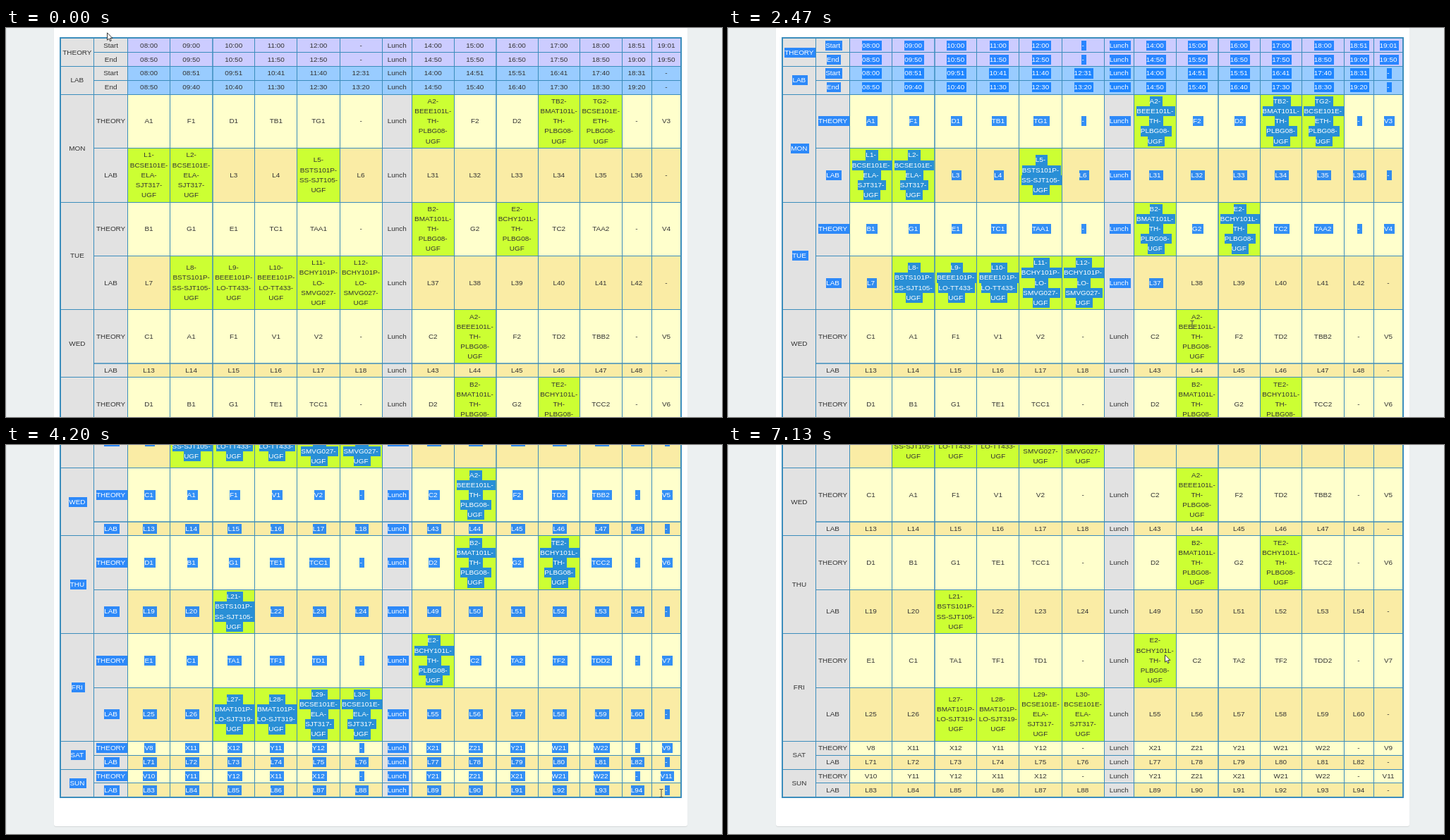
An HTML page for the animation above (7790 ms loop, 1015 px wide and 552 px high).

```html
<!DOCTYPE html>
<html lang="en">
<head>
<meta charset="utf-8">
<title>Timetable selection</title>
<style>
html, body { margin: 0; width: 100%; height: 100%; overflow: hidden; }
#stage { position: relative; width: 1015px; height: 552px; overflow: hidden; background: #ecf0f1; }
#stage div, #stage svg { position: absolute; box-sizing: border-box; }
#edge { left: 0; top: 0; width: 1px; height: 552px; background: #dfe3e5; }
#page { left: 0; top: 0; width: 1015px; height: 960px; }
#card { left: 68px; top: -60px; width: 898px; height: 968px; background: #fff; box-shadow: 0 1px 1px rgba(0,0,0,.1); border-radius: 3px; }
.frame { border: 2px solid #3c8dbc; }
.cell { display: flex; flex-direction: column; align-items: center; justify-content: center;
  font: 9.95px/14.15px "Liberation Sans", Arial, sans-serif; color: #333; white-space: nowrap; }
.cell span { padding-right: 3px; margin-right: -3px; }
.cell.on span { background: rgba(0,116,255,.8); color: #fff; }
.line { background: #3c8dbc; }
.heavy { opacity: .75; }
#bar { left: 0; top: 0; width: 38px; height: 3px; background: #3390ff; }
#menu { left: 606px; top: 292px; width: 378px; height: 115px; background: #292a2d; box-shadow: 1px 1px 2px rgba(0,0,0,.55);
  font: 9.5px/20px "Open Sans", "Noto Sans", sans-serif; color: #e8eaed; white-space: nowrap; }
#menu div { left: 0; width: 378px; height: 20px; padding: 0 21px; }
#menu i { position: absolute; right: 21px; font-style: normal; color: #9aa0a6; }
#menu .dim { color: #808387; }
#menu .rule { top: 87px; height: 1px; background: #3f4145; }
#menu .hot { background: #3f4145; }
#arrow, #beam { left: 0; top: 0; overflow: visible; }
</style>
</head>
<body>
<div id="stage">
  <div id="page"><div id="card"></div></div>
  <div id="edge"></div>
  <div id="bar"></div>
  <div id="menu">
    <div id="copy" style="top:4px">Copy<i>Ctrl+C</i></div>
    <div class="dim" style="top:24px">Copy link to highlight</div>
    <div style="top:43px">Search Ondary for “THEORY Start 08:00 09:00 10:00 11:00 12:00 -...”</div>
    <div style="top:63px">Print...<i>Ctrl+P</i></div>
    <div class="rule"></div>
    <div style="top:92px">Inspect</div>
  </div>
  <svg id="arrow" width="10" height="15"><path d="M.5 .8V11.2L2.9 9 4.5 12.7 6.2 12 4.6 8.4H7.9Z" fill="#fff" stroke="#222" stroke-width=".9"/></svg>
  <svg id="beam" width="8" height="12"><path d="M-2.5-5.5H-.7L0-5 .7-5.5H2.5M0-5V5M-2.5 5.5H-.7L0 5 .7 5.5H2.5" fill="none" stroke="#444"/></svg>
</div>
<script>
const $ = id => document.getElementById(id);
const page = $('page');
const GREY = '#e2e2e2', GREEN = '#ccff33';
const LEFT = 77, TOP = 15, LINE = 14.15, PAD = 5.65;

// Course text ("/" breaks the line) and the slots it fills.
const COURSES = {
  'BEEE101L-/TH-/PLBG08-/UGF': 'A2',
  'BMAT101L-/TH-/PLBG08-/UGF': 'B2 TB2',
  'BCHY101L-/TH-/PLBG08-/UGF': 'E2 TE2',
  'BCSE101E-/ETH-/PLBG08-/UGF': 'TG2',
  'BCSE101E-/ELA-/SJT317-/UGF': 'L1 L2 L29 L30',
  'BSTS101P-/SS-SJT105-/UGF': 'L5 L8 L21',
  'BEEE101P-/LO-TT433-/UGF': 'L9 L10',
  'BCHY101P-/LO-/SMVG027-/UGF': 'L11 L12',
  'BMAT101P-/LO-SJT319-/UGF': 'L27 L28'
};
const booked = {};
for (const [text, slots] of Object.entries(COURSES)) {
  for (const slot of slots.split(' ')) booked[slot] = `${slot}-/${text}`;
}

const DAYS = {
  MON: 'A1 F1 D1 TB1 TG1 - Lunch A2 F2 D2 TB2 TG2 - V3',
  TUE: 'B1 G1 E1 TC1 TAA1 - Lunch B2 G2 E2 TC2 TAA2 - V4',
  WED: 'C1 A1 F1 V1 V2 - Lunch C2 A2 F2 TD2 TBB2 - V5',
  THU: 'D1 B1 G1 TE1 TCC1 - Lunch D2 B2 G2 TE2 TCC2 - V6',
  FRI: 'E1 C1 TA1 TF1 TD1 - Lunch E2 C2 TA2 TF2 TDD2 - V7',
  SAT: 'V8 X11 X12 Y11 Y12 - Lunch X21 Z21 Y21 W21 W22 - V9',
  SUN: 'V10 Y11 Y12 X11 X12 - Lunch Y21 Z21 X21 W21 W22 - V11'
};

const run = (n, first, f) => Array.from({ length: n }, (_, i) => f(first + i));
const hours = (min, late) => {
  const at = h => String(h).padStart(2, '0') + min;
  return [...run(5, 8, at), '-', 'Lunch', ...run(5, 14, at), ...late.split(' ')];
};
const labs = day => {
  const am = day < 5 ? 6 * day + 1 : 12 * day + 11;
  const pm = am + (day < 5 ? 30 : 6);
  const slot = n => 'L' + n;
  return [...run(6, am, slot), 'Lunch', ...run(6, pm, slot), '-'];
};
const rows = [
  hours(':00', '18:51 19:01'),
  hours(':50', '19:00 19:50'),
  '08:00 08:51 09:51 10:41 11:40 12:31 Lunch 14:00 14:51 15:51 16:41 17:40 18:31 -'.split(' '),
  '08:50 09:40 10:40 11:30 12:30 13:20 Lunch 14:50 15:40 16:40 17:30 18:30 19:20 -'.split(' '),
  ...Object.values(DAYS).flatMap((theory, day) => [theory.split(' '), labs(day)])
];
const groups = ['THEORY', 'LAB', ...Object.keys(DAYS)];

// Columns come in blocks of equal width; a row is as tall as its longest cell.
const xs = [LEFT], ys = [TOP];
for (const [n, w] of [[2, 47.75], [6, 60.1], [1, 42.4], [5, 59.5], [2, 42]]) {
  for (let i = 0; i < n; i++) xs.push(xs.at(-1) + w);
}
for (const row of rows) {
  const lines = Math.max(...row.map(s => (booked[s] || s).split('/').length));
  ys.push(ys.at(-1) + PAD + LINE * lines);
}
const right = xs.at(-1), bottom = ys.at(-1);

function box(cls, x, y, w, h) {
  const el = document.createElement('div');
  el.className = cls;
  Object.assign(el.style, { left: x + 'px', top: y + 'px', width: w + 'px', height: h + 'px' });
  return page.appendChild(el);
}

const cells = [];
function addCell(text, col, row, fill, span = 1) {
  const x0 = xs[col], x1 = xs[col + 1], y0 = ys[row], y1 = ys[row + span];
  const el = box('cell', x0, y0, x1 - x0, y1 - y0);
  el.style.background = fill;
  for (const part of text.split('/')) {
    el.appendChild(document.createElement('span')).textContent = part;
  }
  cells.push({ x0, x1, y0, y1, el });
}

rows.forEach((row, r) => {
  const odd = r % 2, head = r < 4;
  if (!odd) addCell(groups[r / 2], 0, r, GREY, 2);
  addCell((head ? ['Start', 'End'] : ['THEORY', 'LAB'])[odd], 1, r, GREY);
  const fill = r < 2 ? '#ccccff' : head ? '#99ccff' : odd ? '#faeca5' : '#ffffcc';
  row.forEach((slot, c) => {
    const grey = slot === 'Lunch' && !head;
    addCell(booked[slot] || slot, c + 2, r, booked[slot] ? GREEN : grey ? GREY : fill);
  });
});

// Start pixel and thickness of a grid line
const rule = (p, heavy) => heavy ? [Math.round(p - 1), 2, 'line heavy'] : [Math.floor(p), 1, 'line'];
xs.slice(1, -1).forEach((p, i) => {
  const [x, w, cls] = rule(p, i === 3 || i === 10);
  box(cls, x, TOP, w, bottom - TOP);
});
ys.slice(1, -1).forEach((p, i) => {
  const [y, h, cls] = rule(p, i === 8);
  const x = i % 2 ? LEFT : xs[1];
  box(cls, x, y, right - x, h);
});
box('frame', LEFT - 1, TOP - 2, right - LEFT + 2, bottom - TOP + 3);

const LOOP = 7790, TICK = 1000 / 15;

// Pointer moves: start tick, end tick, x, y
const MOVES = [
  [0, 12, 93, 25], [12, 15, 88, 33], [15, 20, 84, 33], [27, 39, 773, 498],
  [43, 50, 650, 523], [50, 61, 906, 493], [61, 65, 951, 495],
  [67, 76, 607, 292], [87, 91, 619, 297]
];

const within = (k, from, to) => k >= from && k < to;
const part = (k, from, to) => Math.min(1, Math.max(0, (k - from) / (to - from)));
const scrollAt = k => Math.round(367 * part(k, 43, 47) ** 3.7);

function pointer(k) {
  let x = 143, y = 6;
  for (const [from, to, tx, ty] of MOVES) {
    const f = part(k, from, to);
    x += (tx - x) * f;
    y += (ty - y) * f;
  }
  return [x, y];
}

// The selection trails the pointer by one tick.
function lastSelected(k) {
  let at;
  if (within(k, 28, 43)) at = k - 1;
  else if (within(k, 50, 107)) at = Math.min(Math.max(50, k - 1), 66);
  else return -1;
  const [x, py] = pointer(at);
  const y = Math.min(py + scrollAt(at), bottom - 1);
  return cells.findIndex(c => within(x, c.x0, c.x1) && within(y, c.y0, c.y1));
}

const show = (el, yes) => { el.style.visibility = yes ? 'visible' : 'hidden'; };

function draw(k) {
  const [x, y] = pointer(k);
  const beam = within(k, 13, 81) || within(k, 99, 107);
  const away = within(k, 43, 50);
  for (const id of ['arrow', 'beam']) {
    $(id).style.transform = `translate(${Math.round(x)}px,${Math.round(y)}px)`;
    show($(id), !away && beam === (id === 'beam'));
  }
  page.style.top = -scrollAt(k) + 'px';
  show($('bar'), away);
  show($('menu'), within(k, 81, 99));
  $('copy').classList.toggle('hot', within(k, 90, 99));
  const last = lastSelected(k);
  cells.forEach((c, i) => c.el.classList.toggle('on', i <= last));
}

let shown = -1;
function loop() {
  const k = Math.floor((performance.now() % LOOP + 5) / TICK);
  if (k !== shown) draw(shown = k);
  requestAnimationFrame(loop);
}
loop();
</script>
</body>
</html>
```
